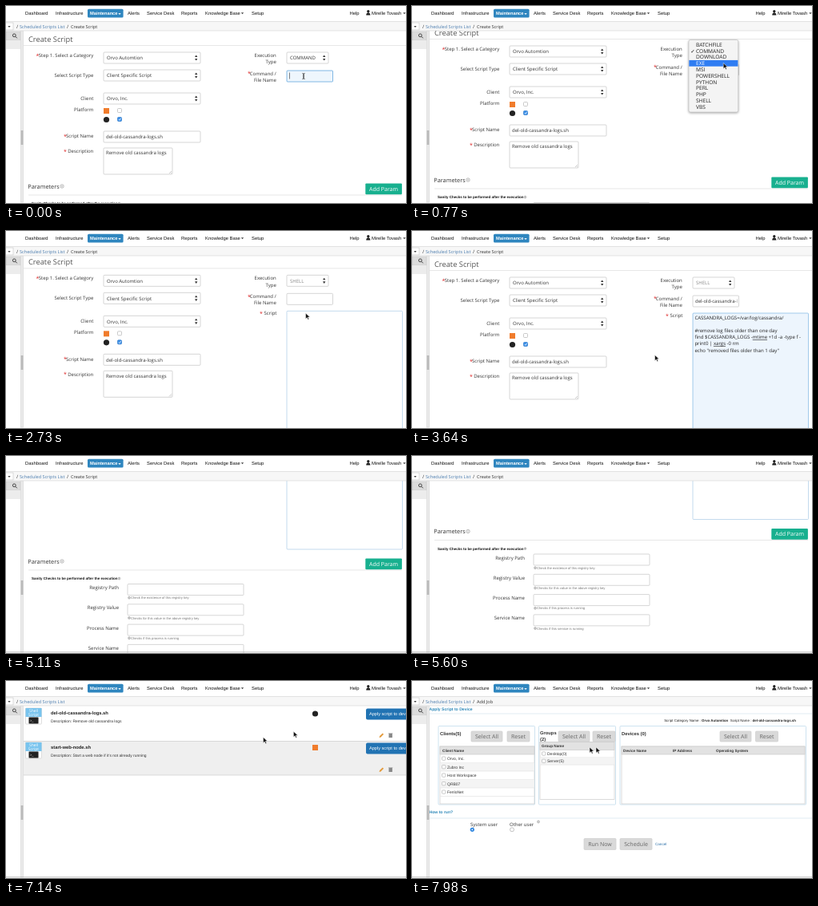
An HTML page for the animation above (8000 ms loop, 500 px wide and 247 px high).

```html
<!DOCTYPE html>
<html lang="en">
<head>
<meta charset="utf-8">
<title>Create Script</title>
<style>
  html, body { margin: 0; width: 100%; height: 100%; overflow: hidden; background: #fff; }
  #stage { display: block; width: 100%; height: 100%; }
  text { font-family: "Open Sans", sans-serif; font-size: 6px; white-space: pre; text-rendering: geometricPrecision; }
  .sans { font-family: "Liberation Sans", Arial, sans-serif; }
  .misspelt { text-decoration: underline dotted 0.6px #e33; }
</style>
</head>
<body>
<svg id="stage" viewBox="0 0 500 247"></svg>
<script>
const LOOP = 8000, STEP = 70;
const stage = document.getElementById('stage');

function add(parent, tag, attrs = {}, content) {
  const node = document.createElementNS('http://www.w3.org/2000/svg', tag);
  for (const key in attrs) node.setAttribute(key, attrs[key]);
  if (content !== undefined) node.textContent = content;
  return parent.appendChild(node);
}
const group = (p, attrs) => add(p, 'g', attrs);
const view = (p, x, y, w, h) => add(p, 'svg', { x, y, width: w, height: h, viewBox: `${x} ${y} ${w} ${h}` });
const box = (p, x, y, w, h, fill, stroke = 'none', rx = 0) =>
  add(p, 'rect', { x, y, width: w, height: h, fill, stroke, rx, 'stroke-width': 0.7 });
const line = (p, x1, y, x2, stroke = '#ddd') => add(p, 'path', { d: `M${x1} ${y}H${x2}`, stroke, 'stroke-width': 0.7 });
const shape = (p, d, fill) => add(p, 'path', { d, fill });

function label(p, x, y, content, { size = 6, fill = '#333', bold, end, mid, sans } = {}) {
  const style = `font-size:${size}px;fill:${fill};` + (bold ? 'font-weight:bold' : '');
  return add(p, 'text', {
    x, y, style, class: sans ? 'sans' : '', 'text-anchor': end ? 'end' : mid ? 'middle' : 'start'
  }, content);
}
const down = (p, x, y, fill = '#444') => shape(p, `M${x - 1.7} ${y}h3.4l-1.7 2z`, fill);
const info = (p, x, y, r = 1.8) => {
  add(p, 'circle', { cx: x, cy: y, r, fill: 'none', stroke: '#777', 'stroke-width': 0.5 });
  shape(p, `M${x - 0.3} ${y - 1}h.6v2h-.6z`, '#777');
};
function field(p, x, y, w, h, content = '') {
  const rect = box(p, x, y, w, h, '#fff', '#c4c4c4', 1);
  return { rect, text: label(view(p, x, y, w - 2, h), x + 3, y + 9.2, content) };
}
function select(p, x, y, w, content) {
  const f = field(p, x, y, w, 14, content);
  f.text.setAttribute('x', x + 4);
  shape(p, `M${x + w - 7} ${y + 6}h3.4l-1.7-2.6zm0 2h3.4l-1.7 2.6z`, '#333');
  return f;
}
const star = (p, x, y) => label(p, x, y + 0.8, '*', { fill: '#d22', size: 7 });
function fieldLabel(p, x, y, name, starX) {
  label(p, x, y, name, { end: true });
  if (starX) star(p, starX, y);
}
const check = (p, x, y, on, s = 5) => {
  box(p, x, y, s, s, on ? '#3b8fe8' : '#fff', on ? '#2c78c8' : '#b4b4b4', 1);
  if (on) add(p, 'path', { d: `M${x + 1.2} ${y + 2.6}l1.2 1.2l1.8-2.7`, fill: 'none', stroke: '#fff', 'stroke-width': 0.8 });
};
const tile = (p, x, y) => box(p, x, y, 7, 7, '#f07c2c');
const disc = (p, x, y) => add(p, 'circle', { cx: x, cy: y, r: 3.6, fill: '#222' });

// Form page
const pages = view(stage, 22, 31, 478, 216);
const form = group(pages);
label(form, 28, 44.5, 'Create Script', { size: 9.3, fill: '#555' });
line(form, 22, 49.5, 500);
[[64, 'Step 1. Select a Category', 37.5], [89, 'Select Script Type'], [117.5, 'Client'], [132, 'Platform'],
 [165.2, 'Script Name', 72], [184.2, 'Description', 72]].forEach(([y, name, starX]) => fieldLabel(form, 109.3, y, name, starX));
select(form, 122, 58, 121, 'Orvo Automtion');
select(form, 122, 80, 121, 'Client Specific Script');
select(form, 122, 109, 121, 'Orvo, Inc.');
tile(form, 122, 128);
check(form, 139.5, 128.5);
disc(form, 125.5, 142.5);
check(form, 139.5, 139.5, true);
field(form, 122, 157, 121, 14, 'del-old-cassandra-logs.sh');
field(form, 122, 178, 86, 33, 'Remove old cassandra logs').text.setAttribute('y', 186.3);
add(form, 'path', { d: 'M204 210l3-3M206 210l1-1', stroke: '#999', 'stroke-width': 0.5 });

[[64, 'Execution'], [72.3, 'Type'], [86.5, 'Command /', 302], [95, 'File Name']].forEach(([y, name, starX]) =>
  fieldLabel(form, 337.8, y, name, starX));
const execType = select(form, 351, 58, 52, '');
const command = field(form, 351, 81, 57.5, 14);
const caret = box(form, 354, 83.5, 0.6, 8, '#333');

const script = group(form);
fieldLabel(script, 338.5, 108, 'Script', 317);
const scriptBox = box(script, 351, 103, 144.5, 214, '#fff', '#a9cbe6', 1);
const scriptText = group(script);
[[111, 'CASSANDRA_LOGS=/var/log/cassandra/'], [127, '#remove log files older than one day'],
 [135.2, 'find $CASSANDRA_LOGS -', 'mtime', ' +1d -a -type f -'], [143.4, 'print0 | ', 'xargs', ' -0 rm'],
 [151.6, 'echo "removed files older than 1 day"']].forEach(([y, ...parts]) => {
  const row = label(scriptText, 353.4, y, '', { size: 6.05, fill: '#222' });
  parts.forEach((s, i) => add(row, 'tspan', i === 1 ? { class: 'misspelt' } : {}, s));
});

const params = group(form);
label(params, 27.3, 228.5, 'Parameters', { size: 7.3 });
info(params, 70, 226, 2.2);
line(params, 28, 237, 495);
box(params, 449.3, 222.4, 45.6, 13.9, '#18b08f', 'none', 1);
label(params, 472, 231.8, 'Add Param', { size: 7, fill: '#fff', mid: true });
label(params, 32, 249.3, 'Sanity Checks to be performed after the execution', { size: 4.5, bold: true, sans: true, fill: '#111' });
info(params, 141.5, 247.6, 1.4);
['Registry Path|Check the existence of this registry key', 'Registry Value|Checks for this value in the above registry key',
 'Process Name|Checks if this process is running', 'Service Name|Checks if this service is running'].forEach((row, i) => {
  const y = 254.5 + i * 25.3, [name, hint] = row.split('|');
  label(params, 141, y + 6.5, name, { end: true });
  field(params, 152, y, 145, 14);
  info(params, 154, y + 17.2, 1.4);
  label(params, 156, y + 18.8, hint, { size: 4.2, sans: true, fill: '#777' });
});

// Script list page
const list = group(pages);
box(list, 22, 75.5, 478, 42.5, '#efefef');
line(list, 22, 75.5, 500, '#ccc');
line(list, 22, 118, 500, '#ccc');
[['del-old-cassandra-logs.sh', 'Remove old cassandra logs'],
 ['start-web-node.sh', "Start a web node if it's not already running"]].forEach(([name, about], i) => {
  const row = group(list, { transform: `translate(0 ${i * 43})` });
  box(row, 24.5, 34, 20, 20, '#fff', '#d0d0d0', 1);
  box(row, 24.5, 34, 20, 11, '#79c4ee');
  label(row, 34.5, 39, 'Shell', { size: 5, fill: '#fff', mid: true });
  label(row, 34.5, 44, 'Script', { size: 5, fill: '#fff', mid: true });
  box(row, 28.5, 45.5, 12, 8, '#222', '#888', 1);
  label(row, 30, 50.5, '>_', { size: 4, fill: '#fff', sans: true });
  label(row, 56, 42, name, { size: 5.8, bold: true, sans: true, fill: '#222' });
  label(row, 56, 52, 'Description: ' + about, { size: 4.95, sans: true });
  if (i) tile(row, 383, 37); else disc(row, 386.5, 41);
  box(row, 450, 34.5, 54, 14, '#2173b3', 'none', 2);
  label(row, 454, 43.3, 'Apply script to device', { size: 5.6, sans: true, fill: '#fff' });
  shape(row, 'M466.5 71l.6-2l3.6-3.6l1.4 1.4l-3.6 3.6z', '#e39a3b');
  shape(row, 'M478.5 66h4.4v5h-4.4zM478 65h5.4v.6h-5.4z', '#888');
});

// Apply-to-device page
const job = group(pages);
const heading = (x, y, s, size = 5.8) => label(job, x, y, s, { size, bold: true, sans: true });
const button = (x, y, w, h, s) => {
  box(job, x, y, w, h, '#d9d9d9', '#cfcfcf', 1);
  label(job, x + w / 2, y + h / 2 + 2.5, s, { size: 7, mid: true, fill: '#666' });
};
[[37, 'Apply Script to Device', 41], [166, 'How to run?', 172]].forEach(([y, s, rule]) => {
  label(job, 21.5, y, s, { size: 5.1, bold: true, sans: true, fill: '#2b87b8' });
  line(job, 22, rule, 500, '#d5e4ee');
});
const summary = label(job, 480, 51.3, '', { size: 4.4, sans: true, end: true, fill: '#222' });
['Script Category Name : ', 'Orvo Automtion', '  Script Name : ', 'del-old-cassandra-logs.sh'].forEach((s, i) =>
  add(summary, 'tspan', i % 2 ? { 'font-weight': 'bold' } : {}, s));
[[33, 120.5], [158.5, 96], [260, 232.5]].forEach(([x, w]) => box(job, x, 56.5, w, 98.5, '#fff', '#b9d7ea', 1));

function table(x, y, w, h, columns, rows, pitch) {
  box(job, x, y, w, h, '#fff', '#ccc');
  box(job, x, y, w, 10, '#e2e2e2', '#ccc');
  columns.forEach(([cx, s]) => heading(cx, y + 6.7, s, 4.7));
  rows.forEach((s, i) => {
    const top = y + 10 + i * pitch;
    if (i % 2) box(job, x + 0.4, top, w - 0.8, pitch, '#f4f4f4');
    line(job, x, top + pitch, x + w, '#e4e4e4');
    check(job, x + 2.5, top + pitch / 2 - 2.3, false, 4.4);
    label(job, x + 9, top + pitch / 2 + 1.8, s, { size: 5, sans: true });
  });
}
heading(35, 67.5, 'Clients(5)');
heading(160, 67, 'Groups');
heading(160, 74.5, '(2)');
heading(262, 67.5, 'Devices (0)');
[[74, 119], [183, 226], [385, 429.5]].forEach(([a, b]) => {
  button(a, 63, 39, 13, 'Select All');
  button(b, 63, 28, 13, 'Reset');
});
table(35, 82, 118, 72, [[38, 'Client Name']], ['Orvo, Inc.', 'Zubro Inc', 'Host Workspace', 'QRB07', 'FenloNet'], 10.5);
table(160, 76.5, 93, 72, [[162, 'Group Name']], ['Desktop(0)', 'Server(5)'], 9.3);
table(262, 82, 229, 72, [[264, 'Device Name'], [326, 'IP Address'], [380, 'Operating System']], [], 10);
label(job, 73, 182.3, 'System user');
label(job, 122, 182.3, 'Other user');
info(job, 158, 176.5, 1.5);
add(job, 'circle', { cx: 75.3, cy: 186.3, r: 2.6, fill: '#2f86e0' });
add(job, 'circle', { cx: 75.3, cy: 186.3, r: 0.9, fill: '#fff' });
add(job, 'circle', { cx: 125, cy: 186.3, r: 2.5, fill: '#fff', stroke: '#999', 'stroke-width': 0.6 });
button(215, 197.5, 40, 14, 'Run Now');
button(260, 197.5, 40, 14, 'Schedule');
label(job, 304, 206, 'Cancel', { size: 4.6, sans: true, fill: '#2b6fa8' });

// Side panel
box(stage, 0, 31, 21.5, 216, '#fff');
box(stage, 0, 32, 18, 11, '#dcdcdc', '#c8c8c8');
add(stage, 'circle', { cx: 10.3, cy: 36.8, r: 1.9, fill: 'none', stroke: '#333', 'stroke-width': 0.9 });
add(stage, 'path', { d: 'M11.8 38.3l2 2', stroke: '#333', 'stroke-width': 1 });
box(stage, 0, 44, 18, 10, '#ececec');
box(stage, 18.5, 31, 3, 215, '#eaeaea', '#d8d8d8');
box(stage, 18.5, 156, 3, 18, '#bbb');
const bottomRule = line(stage, 0, 245.8, 500, '#aaa');

// Top bar and breadcrumb
box(stage, 0, 0, 500, 31, '#fff');
box(stage, 0, 19.5, 500, 11.5, '#f7f7f7');
line(stage, 0, 19.5, 500, '#d8d8d8');
line(stage, 0, 31, 500, '#d8d8d8');
box(stage, 102, 3.8, 44.6, 10.6, '#2f86bf', 'none', 1.5);
[[24, 'Dashboard'], [62, 'Infrastructure'], [152, 'Alerts'], [176, 'Service Desk'], [219, 'Reports'],
 [249, 'Knowledge Base'], [307, 'Setup'], [429.5, 'Help'], [457, 'Mirelle Tovash']].forEach(([x, s]) =>
  label(stage, x, 11.3, s, { size: 5.85, sans: true, fill: '#111' }));
label(stage, 105, 11.3, 'Maintenance', { size: 5.7, sans: true, bold: true, fill: '#fff' });
down(stage, 142, 9, '#fff');
down(stage, 295.5, 8.3);
down(stage, 498, 8.3);
shape(stage, 'M452.8 5a1.6 1.6 0 0 1 0 3.4a1.6 1.6 0 0 1 0-3.4M450.2 11.5q0-3 2.6-3q2.6 0 2.6 3z', '#222');
box(stage, -1, 21, 10, 9, '#fff', '#ccc');
down(stage, 4, 25);
label(stage, 13, 27.8, '/');
label(stage, 17, 27.8, 'Scheduled Scripts List', { size: 5.6, fill: '#4a7cae' });
const crumbSlash = label(stage, 76, 27.8, '/');
const crumb = label(stage, 81, 27.8, '', { size: 5.6 });

// Type menu
const TYPES = ['BATCHFILE', 'COMMAND', 'DOWNLOAD', 'EXE', 'MSI', 'POWERSHELL', 'PYTHON', 'PERL', 'PHP', 'SHELL', 'VBS'];
const MENU_TOP = 44.5, PITCH = 7.8;
const menu = group(stage, { style: 'filter:drop-shadow(0 1px 1.5px rgba(0,0,0,.35))' });
box(menu, 346, 42.5, 61.7, 90.5, '#f4f4f4', '#c4c4c4', 2);
const highlight = box(menu, 346.3, 0, 61.1, PITCH, '#2f7df2');
label(menu, 348.3, MENU_TOP + PITCH + 6.3, '✓', { size: 6.5, fill: '#111' }).style.fontFamily = '"DejaVu Sans", sans-serif';
const items = TYPES.map((s, i) => label(menu, 355, MENU_TOP + i * PITCH + 6.2, s, { size: 6.6 }));

// Pointers
const ARROW = 'M0 0V7.2l1.8-1.6l1.2 2.6l1.2-.6l-1.2-2.5h2.4z';
const pointers = [0, 1].map(() => add(stage, 'path', { d: ARROW, fill: '#111', stroke: '#fff', 'stroke-width': 0.5 }));
const beam = add(stage, 'path', {
  d: 'M-1.6-3.6q1.6 0 1.6 1.2v4.8q0 1.2-1.6 1.2M1.6-3.6q-1.6 0-1.6 1.2v4.8q0 1.2 1.6 1.2',
  fill: 'none', stroke: '#222', 'stroke-width': 0.7
});

// Each row: time, values
const SCROLL = [[0, 0], [140, 0], [350, 8], [2590, 8], [2800, 0], [4270, 0], [5040, 200], [5250, 200], [5670, 245]];
const POINTER = [[0, 372, 88], [140, 372, 88], [420, 385, 57], [560, 386, 58], [770, 389.2, 71.5], [1330, 386, 96], [1890, 378.5, 110.5],
  [2240, 377, 118], [2590, 377, 118], [2870, 372, 88], [3150, 372, 88], [3360, 372, 125], [3640, 303.5, 155.5], [4270, 303.5, 155.5],
  [5950, 110, 222], [6160, 12, 101], [6230, 26, 104], [6440, 80, 104], [6790, 170, 100], [7350, 473, 41], [7630, 473, 41],
  [7910, 230, 83], [7980, 222, 83]];

function sample(rows, t) {
  const next = rows.findIndex(row => row[0] > t);
  if (next < 0) return rows[rows.length - 1].slice(1);
  const a = rows[next - 1], b = rows[next], k = (t - a[0]) / (b[0] - a[0]);
  return a.slice(1).map((v, i) => v + (b[i + 1] - v) * k);
}
const show = (node, on) => node.setAttribute('visibility', on ? 'visible' : 'hidden');
const move = (node, x, y) => node.setAttribute('transform', `translate(${x} ${y})`);
const between = (t, a, b) => t >= a && t < b;
function paint({ rect }, on, fill, stroke, idleStroke) {
  rect.setAttribute('fill', on ? fill : '#fff');
  rect.setAttribute('stroke', on ? stroke : idleStroke);
}

function render(t) {
  const shell = t >= 2590, page = t < 6020 ? form : t < 7700 ? list : job;
  [form, list, job].forEach(p => p.style.display = p === page ? '' : 'none');
  crumb.textContent = page === form ? 'Create Script' : page === job ? 'Add Job' : '';
  show(crumbSlash, page !== list);
  show(bottomRule, t >= 4270);

  const [x, y] = sample(POINTER, t);
  move(form, 0, -sample(SCROLL, t)[0]);
  move(params, 0, shell ? 106 : 0);
  show(script, shell);
  show(scriptText, t >= 3290);
  paint({ rect: scriptBox }, between(t, 3220, 4060), '#edf5fd', '#7db5e3', '#a9cbe6');

  execType.text.textContent = shell ? 'SHELL' : 'COMMAND';
  execType.text.style.fill = shell ? '#888' : '#333';
  paint(command, t < 420 || between(t, 2870, 3220), '#eef6fd', '#4f9bd8', '#c4c4c4');
  command.text.textContent = 'del-old-cassandra-logs.sh'.slice(0, Math.max(0, Math.floor((t - 2870) / 12)));
  show(caret, t < 420);

  const open = between(t, 490, 2590), active = Math.floor((y - MENU_TOP) / PITCH);
  show(menu, open);
  highlight.setAttribute('y', MENU_TOP + active * PITCH);
  items.forEach((item, i) => item.style.fill = i === active ? '#fff' : '#222');

  const text = t < 210 || between(t, 2870, 3430), visible = !between(t, 4270, 5950);
  const [px, py] = sample(POINTER, Math.max(0, t - STEP));
  show(beam, text);
  move(beam, x, y);
  show(pointers[0], visible && !text);
  move(pointers[0], x, y);
  // Fast motion leaves a second pointer behind
  show(pointers[1], t > 6020 && Math.hypot(x - px, y - py) > 6);
  move(pointers[1], px, py);
}

const start = performance.now();
function tick() {
  const t = (performance.now() - start) % LOOP;
  render(Math.floor(t / STEP) * STEP);
  requestAnimationFrame(tick);
}
tick();
</script>
</body>
</html>
```
